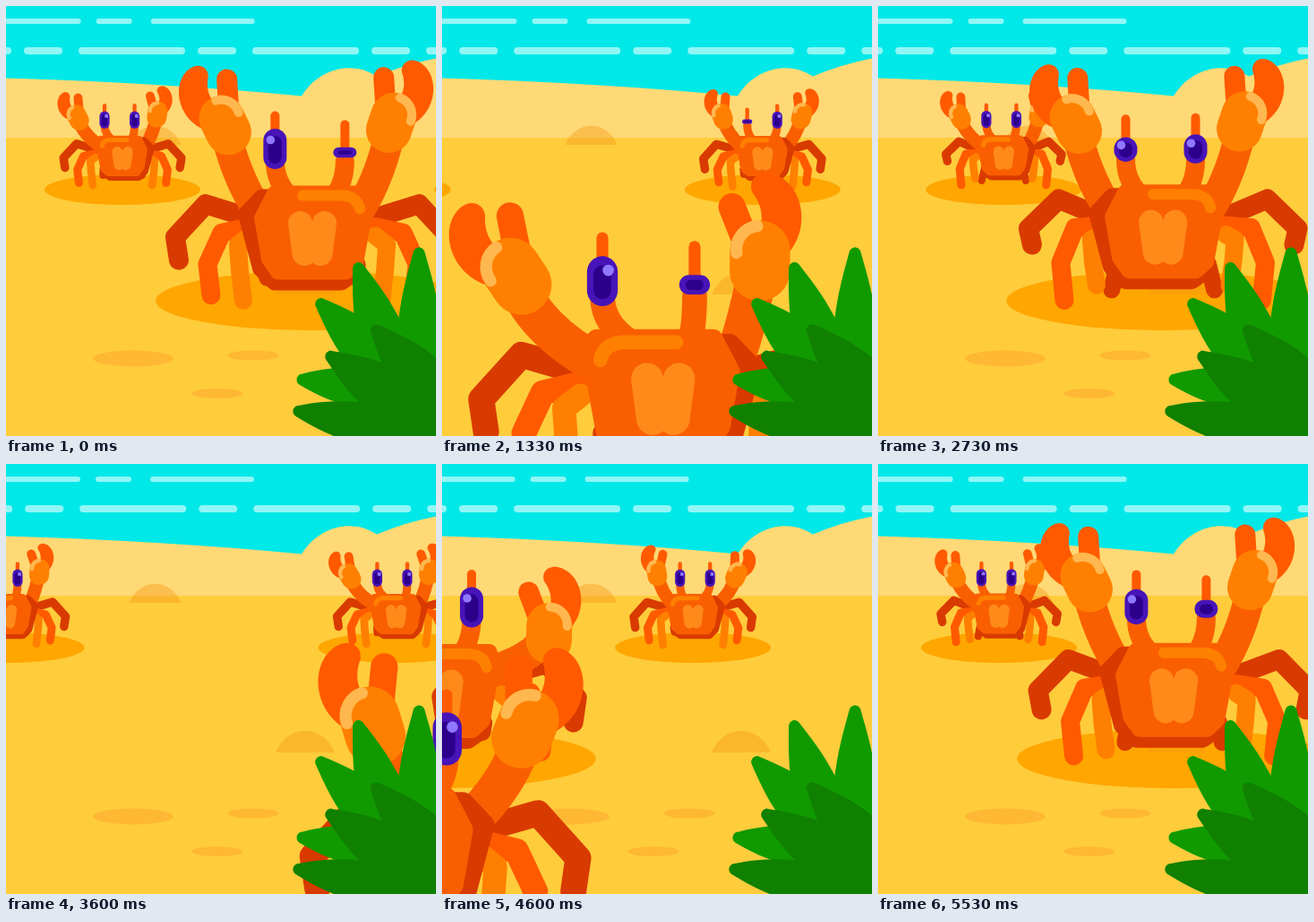
An HTML page with a canvas that plays this animation: 480 by 480 pixels, repeating every 5590 ms.

```html
<!DOCTYPE html>
<html lang="en">
<head>
<meta charset="utf-8">
<title>Crabs on the beach</title>
<style>
html, body { margin: 0; width: 100%; height: 100%; overflow: hidden; background: #ffcc3c; }
canvas { display: block; width: 100vw; height: 100vh; }
</style>
</head>
<body>
<canvas id="stage" width="480" height="480"></canvas>
<script>
const ctx = document.getElementById('stage').getContext('2d');
const LOOP = 5590, STEP = 200 / 3, CYCLE = 2800;

const C = {
  sea: '#00e8e8', foam: '#90f6f6', dune: '#ffd976', sand: '#ffcc3c', spot: '#ffb833',
  shade: '#ffa600', red: '#d93a00', shell: '#f95f00', vivid: '#ff5a00', light: '#ff8000',
  lobe: '#ff8a1a', shine: '#ffb74f', eye: '#4814b8', iris: '#2d008c', glint: '#8f78ff',
  leaf: '#109a00', leafDark: '#108000'
};

const mod = (a, n) => ((a % n) + n) % n;
const mix = (a, b, k) => a + (b - a) * k;
const smooth = x => { x = Math.min(1, Math.max(0, x)); return x * x * (3 - 2 * x); };
const wave = (t, n) => 2 * Math.PI * n * t / CYCLE;

// flip: -1 walks left; sway tilts the claws, drop lowers them
const FAR = {
  y: 145, scale: 0.43, flip: -1, blinkAt: 1345,
  sway: t => 0.4 + Math.cos(wave(t - 500, 1)),
  drop: () => 0.3
};
const MID = {
  y: 201, scale: 1, flip: 1, blinkAt: 2810,
  sway: () => -0.3,
  drop: t => smooth((717 - Math.abs(t - 2016)) / 500)
};
const NEAR = {
  y: 361, scale: 1.32, flip: -1, blinkAt: 1440,
  sway: t => 0.4 + Math.cos(wave(t - 1280, 2)),
  drop: () => 0.3
};

function line(pts, width, color) {
  ctx.beginPath();
  for (let i = 0; i < pts.length; i += 2) ctx.lineTo(pts[i], pts[i + 1]);
  ctx.lineWidth = width;
  ctx.strokeStyle = color;
  ctx.stroke();
}

function curve(x0, y0, cx, cy, x1, y1, width, color) {
  ctx.beginPath();
  ctx.moveTo(x0, y0);
  ctx.quadraticCurveTo(cx, cy, x1, y1);
  ctx.lineWidth = width;
  ctx.strokeStyle = color;
  ctx.stroke();
}

function blob(pts, round, color) {
  ctx.beginPath();
  for (let i = 0; i < pts.length; i += 2) ctx.lineTo(pts[i], pts[i + 1]);
  ctx.closePath();
  ctx.fillStyle = ctx.strokeStyle = color;
  ctx.lineWidth = round;
  ctx.fill();
  ctx.stroke();
}

function oval(x, y, rx, ry, color) {
  ctx.beginPath();
  ctx.ellipse(x, y, rx, ry, 0, 0, 2 * Math.PI);
  ctx.fillStyle = color;
  ctx.fill();
}

function pill(x, y, w, h, color) {
  ctx.beginPath();
  ctx.roundRect(x - w / 2, y - h / 2, w, h, Math.min(w, h) / 2);
  ctx.fillStyle = color;
  ctx.fill();
}

const dash = (x0, x1, y, h) => pill((x0 + x1) / 2, y, x1 - x0, h, C.foam);

function scenery(t) {
  ctx.fillStyle = C.sea;
  ctx.fillRect(0, 0, 480, 480);
  const a = 0.5 + 1.2 * Math.cos(wave(t, 4)), b = 1.3 * Math.sin(wave(t, 4));
  dash(-20, a + 82, 17, 6);
  dash(a + 99, a + 139, 17, 6);
  dash(a + 160, a + 276, 17, 6);
  for (let x = b - 113; x < 480; x += 194) {
    dash(x, x + 119, 50, 8);
    dash(x + 133, x + 176, 50, 8);
  }

  ctx.fillStyle = C.dune;
  ctx.beginPath();
  ctx.moveTo(0, 80.5);
  ctx.quadraticCurveTo(180, 86, 330, 100.5);
  ctx.bezierCurveTo(350, 68, 388, 61, 414, 78.5);
  ctx.quadraticCurveTo(446, 65, 480, 58.5);
  ctx.lineTo(480, 150);
  ctx.lineTo(0, 150);
  ctx.fill();
  ctx.fillStyle = C.sand;
  ctx.fillRect(0, 147, 480, 333);
  oval(142, 393.5, 45, 9, C.spot);
  oval(276, 390, 28.5, 5.5, C.spot);
  oval(236, 432.5, 28.5, 5.5, C.spot);
}

function mound(x, y, w, h) {
  ctx.fillStyle = 'rgba(245, 150, 20, 0.4)';
  ctx.beginPath();
  ctx.moveTo(x - w, y);
  ctx.bezierCurveTo(x - w * 0.6, y - h * 1.35, x + w * 0.6, y - h * 1.35, x + w, y);
  ctx.fill();
}

function claw(x, y, turn, side) {
  ctx.save();
  ctx.translate(x, y);
  ctx.rotate(turn * Math.PI / 180);
  ctx.save();
  ctx.scale(side, 1);
  line([-22, -44, -13, -18], 23, C.vivid);
  ctx.beginPath();
  ctx.moveTo(25, -4);
  ctx.bezierCurveTo(46, -28, 36, -65, 12, -71);
  ctx.bezierCurveTo(-1, -74, -8, -64, -4, -55);
  ctx.bezierCurveTo(5, -42, 4, -30, -2, -16);
  ctx.fillStyle = C.vivid;
  ctx.fill();
  line([0, -6, -1, 11], 51, C.light);
  ctx.restore();
  ctx.beginPath();
  ctx.arc(0, -7, 20, -1.5, 0.1);
  ctx.lineWidth = 10;
  ctx.strokeStyle = C.shine;
  ctx.stroke();
  ctx.restore();
}

function arm(side, sway, drop) {
  const x = side * mix(94, 128, drop) + 16 * sway;
  const y = mix(-71, -13, drop) + side * 5 * sway;
  curve(side * 54 - 4, 32, x * 0.88, (28 + y) / 2 + 10, x, y, 34, C.shell);
  claw(x, y, side * mix(19, 2, drop) + 12 * sway, side);
}

function eye(side, shift, t, closedAt) {
  const away = mod(t - closedAt + CYCLE / 2, CYCLE) - CYCLE / 2;
  const open = smooth(Math.abs(away) / 130);
  const x = side * 39 + shift, y = -37 - 4 * open;
  curve(side * 22, 14, x, -2, x, -28, 21, C.shell);
  line([x, -68 - 10 * open, x, -30], 10, C.vivid);
  pill(x, y, 26, 11 + 34 * open, C.eye);
  pill(x, y + open, 15, 4 + 27 * open, C.iris);
  if (open > 0.35) oval(x - 5, y - 10 * open, 4.8, 4.8, C.glint);
}

// Legs run from the outer (0) to the inner (2); neighbours step in turn
function leg(i, side, lift) {
  const step = lift * 16 * (i % 2 ? -1 : 1);
  const kneeX = 120 - 18 * i - 4 * lift, kneeY = 22 + 32 * Math.sqrt(i) - 6 * lift;
  const shinX = kneeX + 34 - 18 * i, shinY = kneeY + 38 - 4 * i - step / 3;
  const footX = shinX - 4, footY = kneeY + 66 - step;
  const pts = [70, 36 + 10 * i, kneeX, kneeY, shinX, shinY, footX, footY];
  line(pts.map((v, j) => j % 2 ? v : v * side), 22 - i, [C.red, C.vivid, C.light][i]);
}

function shell() {
  blob([-56, 14, 50, 14, 52, 50, 45, 98, 32, 107, -42, 107, -57, 92, -73, 32], 20, C.red);
  blob([-42, 9, 56, 9, 59, 26, 48, 86, 37, 96, -38, 96, -48, 82, -56, 36], 18, C.shell);
  for (const s of [-1, 1]) line([s * 13.5, 42, s * 9, 76], 27, C.lobe);
  ctx.beginPath();
  ctx.moveTo(-11, 11);
  ctx.lineTo(34, 11);
  ctx.quadraticCurveTo(50, 12, 53, 26);
  ctx.lineWidth = 12;
  ctx.strokeStyle = C.light;
  ctx.stroke();
}

function crab(kind, x, t) {
  const lift = (1 - Math.cos(wave(t, 11) - 0.99)) / 2;
  const sway = kind.sway(t), drop = kind.drop(t);
  ctx.save();
  ctx.translate(x, kind.y - 2 * kind.scale * lift);
  ctx.scale(kind.scale * kind.flip, kind.scale);
  for (const side of [-1, 1]) {
    line([side * 50, 88, side * (48 + 10 * lift), 98 + 21 * lift], 19, C.red);
    for (let i = 0; i < 3; i++) leg(i, side, lift);
    arm(side, sway, drop);
  }
  eye(-1, 9 * sway, t, kind.blinkAt - 140);
  eye(1, 9 * sway, t, kind.blinkAt);
  shell();
  ctx.restore();
}

function leaf(x, y, bx, by, w, color) {
  const len = Math.hypot(bx - x, by - y);
  ctx.save();
  ctx.translate(x, y);
  ctx.rotate(Math.atan2(by - y, bx - x));
  ctx.beginPath();
  ctx.moveTo(8, 0);
  for (const s of [-1, 1]) {
    ctx.moveTo(8, 0);
    ctx.bezierCurveTo(len * 0.15, s * w * 0.3, len * 0.35, s * w, len * 0.65, s * w);
    ctx.quadraticCurveTo(len * 0.9, s * w, len, 0);
  }
  ctx.fillStyle = ctx.strokeStyle = color;
  ctx.lineWidth = 13;
  ctx.fill();
  ctx.stroke();
  ctx.restore();
}

function plant() {
  leaf(461, 268, 462, 470, 20, C.leaf);
  leaf(391, 285, 450, 460, 22, C.leaf);
  leaf(346, 327, 470, 450, 23, C.leaf);
  leaf(323, 416, 460, 436, 17, C.leaf);
  leaf(408, 356, 520, 480, 25, C.leafDark);
  leaf(356, 387, 500, 480, 25, C.leafDark);
  leaf(319, 451, 460, 478, 17, C.leafDark);
  blob([420, 425, 490, 430, 490, 490, 380, 490], 8, C.leafDark);
}

function draw(t) {
  ctx.lineCap = ctx.lineJoin = 'round';
  scenery(t);

  const far = mod(130 - 435 * t / CYCLE + 100, 435) - 100;
  const mid = mod(342 + 1000 * t / CYCLE + 250, 1000) - 250;
  const near = mod(247 - 0.596 * (t - 1333) + 600, 1669) - 600;
  const farXs = [far, far + 435];

  for (const x of farXs) oval(x, 205, 87, 17, C.shade);
  oval(mid, 329, 175, 33, C.shade);
  mound(166.5, 155, 29, 21);
  mound(334, 322, 33, 24);

  for (const x of farXs) crab(FAR, x, t);
  crab(MID, mid, t);
  crab(NEAR, near, t);
  plant();
}

function frame() {
  const i = Math.floor((performance.now() % LOOP + 4) / STEP);
  // The second pass runs half a step ahead of the first
  draw(((i % 42) + (i >= 42 ? 0.5 : 0)) * STEP);
  requestAnimationFrame(frame);
}
frame();
</script>
</body>
</html>
```
